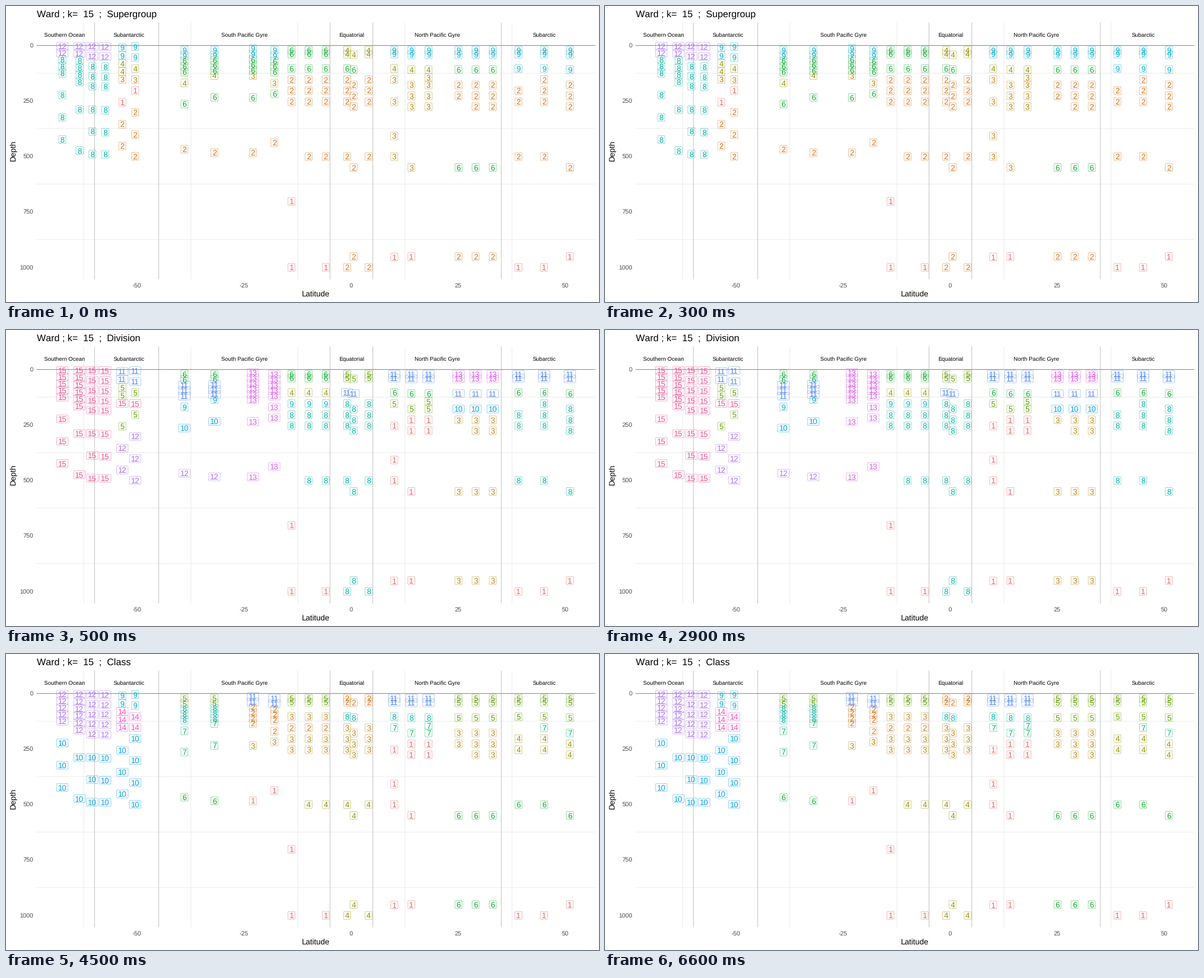
Recreate the animation shown at these times as a matplotlib script. Size 1058x529 px, loop 8 s.

```python
import numpy as np
import matplotlib.pyplot as plt
from matplotlib.animation import FuncAnimation
from matplotlib.patches import FancyBboxPatch

W, H, DPI = 1058, 529, 64
PX = 72 / DPI
plt.rcParams.update({"font.family": "Liberation Sans", "text.hinting": "none",
                     "text.hinting_factor": 1})

LEVELS = ["Supergroup", "Division", "Class"]
COLORS = ("#EE5F5B #D97015 #BC8410 #949400 #5FA000 #10AC30 #00AE6C #00B0A0 "
          "#0CABCB #009FEE #4F86F5 #A96CF5 #DE58EC #F04CC4 #F04F8F").split()
REGIONS = {"Southern Ocean": -67, "Subantarctic": -52, "South Pacific Gyre": -25,
           "Equatorial": 0, "North Pacific Gyre": 20, "Subarctic": 45}


def ladder(top, base, n, *deep):
    """Evenly spaced samples near the surface, then a few deep ones."""
    return [*np.linspace(top, base, n), *deep]


def cast(kind, skip=(), extra=()):
    """A surface pair, four mid-water steps and two deep samples."""
    if kind == "round":
        depths = [21, 39, *range(104, 255, 50), 501, 1001]
    else:
        depths = [21, 42, 109, *range(178, 279, 49), 550, 952]
    return [d for i, d in enumerate(depths) if i not in skip] + list(extra)


STATIONS = {
    -67.5: ladder(4, 125, 5, 223, 324, 424),
    -63.5: ladder(4, 165, 6, 289, 474),
    -60.5: ladder(4, 183, 5, 289, 388, 490),
    -57.5: ladder(5, 186, 5, 292, 391, 491),
    -53.5: ladder(9, 153, 5, 256, 355, 453),
    -50.5: ladder(5, 203, 5, 302, 402, 500),
    -39: ladder(20, 120, 5, 169, 264, 468),
    -32: ladder(21, 136, 6, 234, 484),
    -23: ladder(14, 136, 6, 235, 484),
    -18: ladder(21, 120, 5, 170, 218, 438),
    -14: cast("round", [6], [703]),
    -10: cast("round", [7]),
    -6: cast("round"),
    -1: cast("round"),
    0.5: cast("offset", [0]),
    4: cast("round", [2]),
    10: cast("round", [4, 7], [408, 954]),
    14: cast("offset"),
    18: cast("offset", [6, 7], [144]),
    25: cast("offset", [5]),
    29: cast("offset"),
    33: cast("offset"),
    39: cast("round", [3]),
    45: cast("round"),
    51: cast("offset"),
}

# northern limit of each zone: typical cluster per depth band, at each level
BANDS = (60, 130, 190, 290, 700)
ZONES = {
    -55: ("12 8 8 8 8 8", "15 15 15 15 15 15", "12 12 12 10 10 10"),
    -45: ("9 4 3 1 2 2", "11 5 15 5 12 12", "9 14 14 10 10 10"),
    -30: ("9 6 4 6 2 2", "6 11 9 10 12 12", "5 8 7 7 6 6"),
    -16: ("9 6 3 6 2 2", "13 13 13 13 13 13", "11 2 2 3 1 1"),
    -5: ("6 6 2 2 2 1", "6 4 9 8 8 1", "5 3 2 3 4 1"),
    5: ("4 6 2 2 2 2", "5 11 8 8 8 8", "2 8 3 3 4 4"),
    20: ("9 4 3 3 3 1", "11 6 5 1 1 1", "11 8 7 1 1 1"),
    35: ("9 6 2 2 6 2", "13 11 10 3 3 3", "5 5 3 3 6 6"),
    60: ("9 9 2 2 2 1", "11 6 8 8 8 1", "5 5 7 4 6 1"),
}


def cluster(lat, depth, level):
    zone = next(z for limit, z in ZONES.items() if lat < limit)
    return zone[level].split()[np.searchsorted(BANDS, depth)]


def lat_x(lat):
    return 616.3 + 7.64 * lat


def depth_y(depth):
    return 70.6 + 0.3962 * depth


fig = plt.figure(figsize=(W / DPI, H / DPI), dpi=DPI, facecolor="white")
ax = fig.add_axes([0, 0, 1, 1])
ax.set(xlim=(0, W), ylim=(H, 0))
ax.axis("off")


def text(x, y, s, size, color="black", **kw):
    kw = {"ha": "center", "va": "baseline", **kw}
    return ax.text(x, y, s, fontsize=size * PX, color=color, **kw)


def line(xs, ys, color):
    ax.plot(xs, ys, color=color, lw=PX, zorder=1, snap=False)


def vline(lat, color):
    line([lat_x(lat)] * 2, [30, 488], color)


def hline(depth, color):
    line([55, 1051], [depth_y(depth)] * 2, color)


def label(x, y, name):
    color = COLORS[int(name) - 1]
    w, h = 4.8 + 7.8 * len(name), 14
    box = FancyBboxPatch((x - w / 2, y - h / 2), w, h,
                         boxstyle="round,pad=0,rounding_size=1.3",
                         fc="none", ec=color, lw=0.9 * PX, alpha=0.5, zorder=3)
    ax.add_patch(box)
    return [box, text(x, y + 5, name, 14, color, zorder=3)]


for d in range(125, 1000, 250):
    hline(d, "#EBEBEB")
for lat in np.arange(-62.5, 40, 25):
    vline(lat, "#EBEBEB")
for lat in (-60, -45, -5, 5, 35):
    vline(lat, "#BEBEBE")
hline(0, "#7F7F7F")

for name, lat in REGIONS.items():
    text(lat_x(lat), 54.5, name, 10)
for lat in range(-50, 51, 25):
    text(lat_x(lat) - 0.8, 503, str(lat), 11.2, "#4D4D4D")
for d in range(0, 1001, 250):
    text(48.5, depth_y(d) + 3.6, str(d), 11.2, "#4D4D4D", ha="right")
text(553, 519, "Latitude", 14)
text(13, 258.5, "Depth", 14, rotation=90, va="center")
title = text(55, 19.5, "", 16.8, ha="left")

layers = [[artist for lat, depths in STATIONS.items() for d in depths
           for artist in label(lat_x(lat), depth_y(d), cluster(lat, d, k))]
          for k in range(len(LEVELS))]


def draw(i):
    level = 0 if i < 1 else 1 if i < 9 else 2
    title.set_text(f"Ward ; k=  15  ;  {LEVELS[level]}")
    for k, layer in enumerate(layers):
        for artist in layer:
            artist.set_visible(k == level)
    return []


anim = FuncAnimation(fig, draw, frames=16, interval=500, repeat=True, repeat_delay=0)
plt.show()
```
